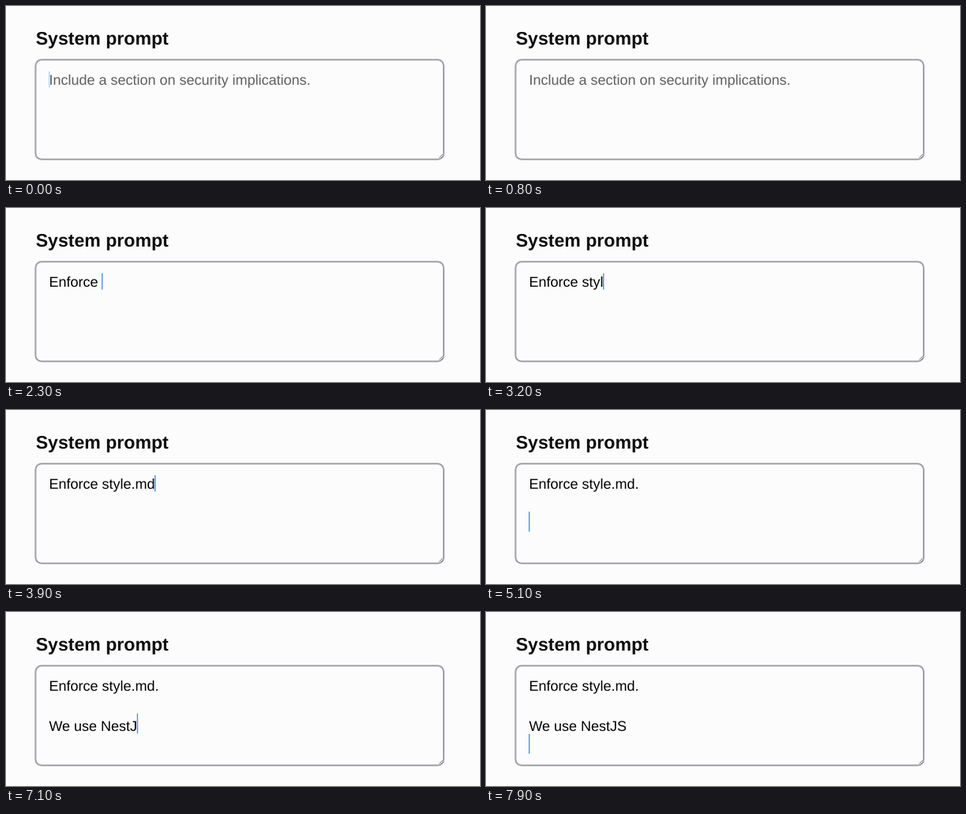
Animation, 600 px wide and 221 px high, one loop 8 s. Source, as an HTML page:

```html
<!DOCTYPE html>
<html lang="en">
<head>
<meta charset="utf-8">
<title>System prompt</title>
<style>
  html, body { margin: 0; width: 100%; height: 100%; overflow: hidden; background: #fcfcfc; }
  svg { display: block; width: 600px; height: 221px; }
  text {
    font: 18px "Liberation Sans", Arial, sans-serif;
    fill: #000;
    white-space: pre;
    text-rendering: geometricPrecision;
  }
  .title { font-size: 23.1px; font-weight: 700; fill: #0c0c0c; }
  #hint { fill: #5e5e60; }
  .field { fill: #fcfcfc; stroke: #9f9fa5; stroke-width: 2; }
  .grip { fill: none; stroke: #808084; stroke-width: 1; }
  #caret { fill: #4a92e6; }
</style>
</head>
<body>
<svg viewBox="0 0 600 221">
  <text class="title" x="37.7" y="49">System prompt</text>
  <rect class="field" x="37.4" y="68.3" width="516.6" height="126.4" rx="7.5"/>
  <path class="grip" d="M548.5 192.5l4-4M551 193l2-2"/>
  <text id="hint" x="54.4" y="99.6">Include a section on security implications.</text>
  <g id="lines"></g>
  <rect id="caret" width="1.4"/>
</svg>
<script>
const LOOP = 8000, TICK = 100, FIRST_KEY = 13;
const LEFT = 54, LINE = 25.65;

// One keystroke per tick; "_" is a tick without one.
const SCORE = "E_nfor__ce _st_y___le_.__md__._______\n\n__We use _N_est____JS______\n";

const $ = id => document.getElementById(id);
const hint = $("hint"), caret = $("caret");

const rows = SCORE.split("\n").map((_, i) => {
  const row = document.createElementNS("http://www.w3.org/2000/svg", "text");
  row.setAttribute("x", LEFT + .4);
  row.setAttribute("y", 99.6 + i * LINE);
  return $("lines").appendChild(row);
});

// Caret opacity: short fade in, steady, short fade out, then dark.
const fade = ms => Math.max(0, Math.min(1, (ms + 100) / 250, (800 - ms) / 200));

function render(tick) {
  const played = SCORE.slice(0, Math.max(0, tick - FIRST_KEY + 1));
  const idle = played.length - played.replace(/_+$/, "").length;
  const parts = played.replaceAll("_", "").split("\n");
  const last = parts.length - 1;

  rows.forEach((row, i) => { row.textContent = parts[i] || ""; });
  hint.style.display = played ? "none" : "";

  const width = parts[last] ? rows[last].getComputedTextLength() : 0;
  caret.setAttribute("x", LEFT + width);
  caret.setAttribute("y", last ? 77.8 + last * LINE : 83);
  caret.setAttribute("height", last ? 25.4 : 20.6);
  caret.style.opacity = fade(played ? Math.max(150, idle * TICK) : tick * TICK % 1100);
}

let shown = -1;
function draw() {
  const tick = Math.floor(performance.now() % LOOP / TICK);
  if (tick !== shown) render(shown = tick);
  requestAnimationFrame(draw);
}
draw();
</script>
</body>
</html>
```
